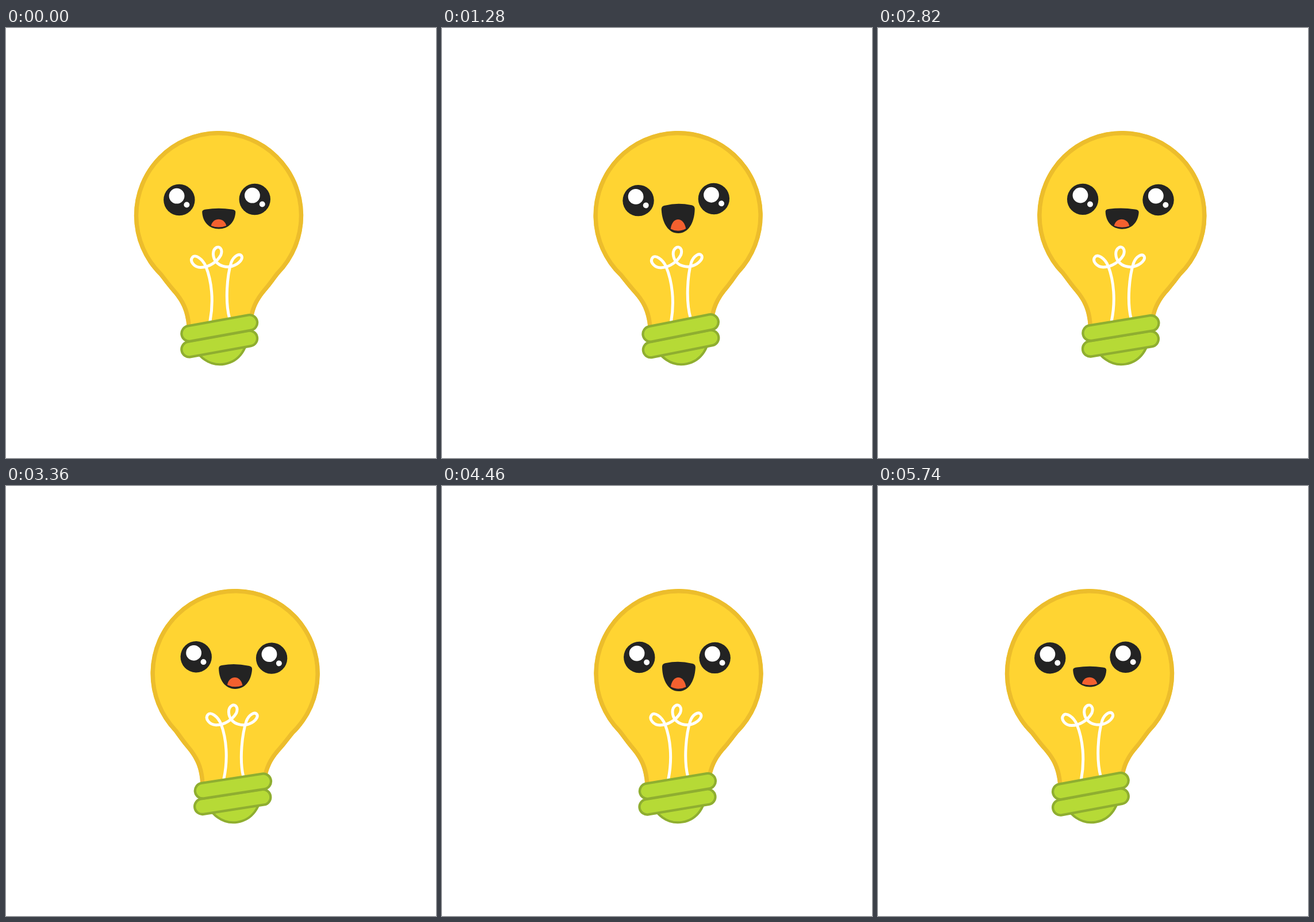
Animation of 748x748 px, one loop 5760 ms. Source, as an HTML page:

```html
<!DOCTYPE html>
<html lang="en">
<head>
<meta charset="utf-8">
<title>Swaying light bulb</title>
<style>
  html, body { margin: 0; width: 100%; height: 100%; overflow: hidden; background: #fff; }
  svg { display: block; width: 100%; height: 100%; }
</style>
</head>
<body>
<svg viewBox="0 0 748 748">
  <defs>
    <path id="glass" d="M-57 200C-57 165 -69 147 -84 130C-91 122 -98 112 -104.3 104A147.2 147.2 0 1 1 104.3 104C98 112 91 122 84 130C69 147 57 165 57 200Z"/>
    <clipPath id="inside"><use href="#glass"/></clipPath>
    <g id="eye">
      <circle r="27.2" fill="#232323"/>
      <circle cx="-4.3" cy="-6.8" r="13.4" fill="#fff"/>
      <circle cx="13" cy="8.5" r="5" fill="#fff"/>
    </g>
    <g id="ring" fill="none" stroke-linecap="round">
      <path d="M319 531.5L424 512.5" stroke="#8fae30" stroke-width="31"/>
      <path d="M319 531.5L424 512.5" stroke="#b6da36" stroke-width="22.4"/>
    </g>
  </defs>
  <g id="bulb">
    <use href="#glass" fill="#ffd432" stroke="#ecbd2c" stroke-width="15" clip-path="url(#inside)"/>
    <g transform="rotate(.45) translate(-370.25 -326)">
      <path fill="none" stroke="#fff" stroke-width="5" d="M355 511C362 475 358 440 348 415C342 401 329 393 324.5 399C319 406 328 416.5 339 416.5C354 416.5 368 406 374 395C378 384 371 379 366 382C358 387 360 400 366 407C372 414 383 417 393 414.5C405 411 413 402 410 396.5C406 391 396 397 392 408C385 430 381 475 389 505"/>
      <path fill="#b6da36" stroke="#8fae30" stroke-width="4" d="M326.5 546.8A46.7 46.7 0 0 0 418.5 530.2Z"/>
      <use href="#ring" y="27.5"/>
      <use href="#ring"/>
      <use href="#eye" id="leftEye"/>
      <use href="#eye" id="rightEye"/>
      <g id="mouth">
        <path fill="#232323" d="M341.5 320.5C341.5 317 344 316 348 315.5Q370 312 393 315.5C397 316 399.5 317 399.5 320.5C398.5 338 387 349.5 370.5 349.5C354 349.5 342.5 338 341.5 320.5Z"/>
        <path fill="#f4602f" d="M357 344C360 329 380 329 383.5 344Q370 349 357 344Z"/>
      </g>
    </g>
  </g>
</svg>
<script>
  const LOOP = 5760;

  // Turning points as [step, value]; the motion between them is even.
  const centerX = [[0, 370], [22, 430], [41.5, 367], [52, 392], [53, 412],
    [59, 429], [80, 380], [100, 422], [123, 368]];
  const tilt = [[0, -.45], [44, -1.95], [61, .48], [83, 1.55], [117, -1.75], [124, -.45]];

  function between(points, s) {
    const i = Math.max(1, points.findIndex(p => p[0] >= s));
    const [s0, v0] = points[i - 1], [s1, v1] = points[i];
    return v0 + (v1 - v0) * (s - s0) / (s1 - s0);
  }

  // Smooth pulse: 1 at the peak, 0 beyond the reach.
  function pulse(s, peak, reach) {
    const d = Math.min(1, Math.abs(s - peak) / reach);
    return Math.cos(d * Math.PI / 2) ** 2;
  }

  // Steps last 20, 100 and 20 ms in turn.
  function stepAt(ms) {
    const t = ms % LOOP, rest = t % 140;
    return 3 * Math.floor(t / 140) + (rest >= 120 ? 2 : rest >= 20 ? 1 : 0);
  }

  const setTransform = (id, value) => document.getElementById(id).setAttribute('transform', value);

  function draw(ms) {
    const s = stepAt(ms);
    const lid = 1 - .86 * pulse(s, 104, 6);
    const mouth = 1 + .46 * (pulse(s, 25, 19) + pulse(s, 90, 33));
    setTransform('bulb', `translate(${between(centerX, s)} 326) rotate(${between(tilt, s)})`);
    setTransform('leftEye', `translate(301.6 299) scale(1 ${lid})`);
    setTransform('rightEye', `translate(433 298) scale(1 ${lid})`);
    setTransform('mouth', `translate(0 332) scale(1 ${mouth}) translate(0 -332)`);
  }

  function tick(now) {
    draw(now);
    requestAnimationFrame(tick);
  }
  draw(0);
  requestAnimationFrame(tick);
</script>
</body>
</html>
```
